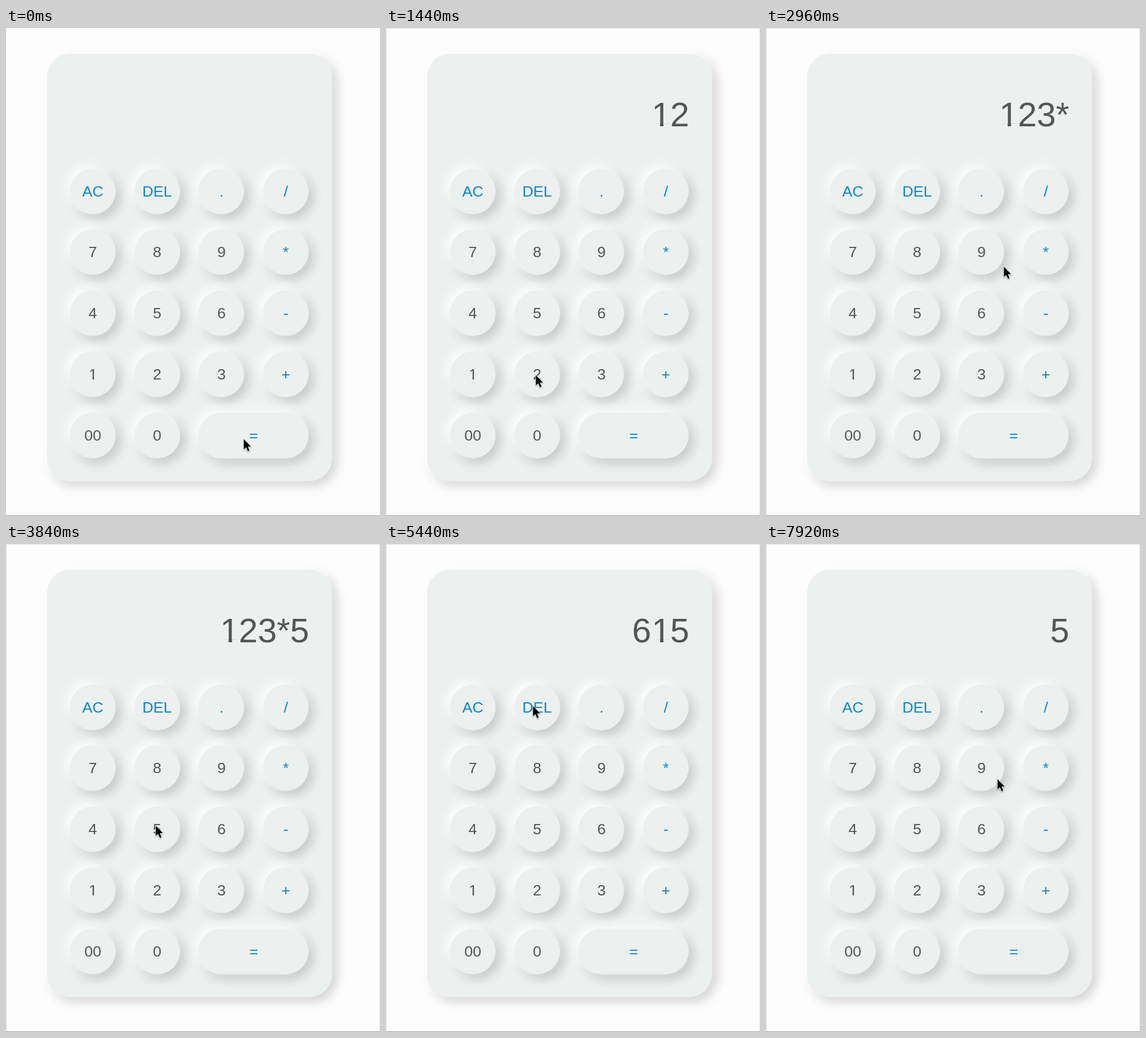
An HTML page for the animation above (8 s loop, 655x854 px).

```html
<!DOCTYPE html>
<html lang="en">
<head>
<meta charset="utf-8">
<title>Calculator</title>
<style>
  html, body { margin: 0; width: 100%; height: 100%; overflow: hidden; }
  body { background: #fdfdfd; font: 26.67px/1 "Liberation Sans", Arial, sans-serif; color: #555; }
  #stage { position: relative; width: 655px; height: 854px; overflow: hidden; }
  #stage > * { position: absolute; box-sizing: border-box; }
  .raised {
    background: #ecf0ef;
    box-shadow: -6.7px -6.7px 20px #fff, 6.7px 6.7px 20px rgba(0, 0, 0, .2);
  }
  #card { left: 72px; top: 45px; width: 499px; height: 748px; border-radius: 40px; }
  #display { right: 124px; top: 122px; font-size: 60px; white-space: nowrap; }
  .key { width: 80px; height: 80px; border-radius: 40px; line-height: 80px; text-align: center; }
  .wide { width: 193px; }
  .op { color: #0b87cb; }
  /* Trims the foot of the numeral one, leaving only its stem. */
  .one {
    display: inline-block;
    line-height: 1;
    position: relative;
    left: .015em;
    clip-path: polygon(0 0, 1em 0, 1em .755em, .345em .755em, .345em 1em, .246em 1em, .246em .755em, 0 .755em);
  }
  #frame { inset: 0; border: 1px solid #e2e3e3; border-bottom: 0; }
  #rule { left: 0; bottom: 0; width: 100%; height: 1px; background: #999; }
  #cursor { left: 0; top: 0; width: 20px; height: 28px; overflow: visible; filter: drop-shadow(0 1px 1px rgba(0, 0, 0, .35)); }
</style>
</head>
<body>
<div id="stage">
  <div id="card" class="raised"></div>
  <div id="display"></div>
  <div id="frame"></div>
  <div id="rule"></div>
  <svg id="cursor"><path d="M.5 .5V18.5L4.6 14.7 7.6 21.8 10.5 20.6 7.5 13.5H13Z" stroke="#fff" stroke-width="1.4" paint-order="stroke"/></svg>
</div>
<script>
const LOOP = 8000, STEP = 80;
const stage = document.getElementById('stage');
const display = document.getElementById('display');
const frame = document.getElementById('frame');
const cursor = document.getElementById('cursor');

const markup = text => text.replace(/1/g, '<span class="one">1</span>');

const rows = ['AC DEL . /', '7 8 9 *', '4 5 6 -', '1 2 3 +', '00 0 ='];
rows.forEach((row, r) => row.split(' ').forEach((label, c) => {
  const key = document.createElement('div');
  key.className = 'key raised';
  key.classList.toggle('op', !/\d/.test(label));
  key.classList.toggle('wide', label === '=');
  key.style.left = 112 + c * 112.7 + 'px';
  key.style.top = 245.5 + r * 106.75 + 'px';
  key.innerHTML = markup(label);
  stage.insertBefore(key, display);
}));

const readout = [
  [0, ''], [800, '1'], [1440, '12'], [2080, '123'], [2640, '123*'], [3600, '123*5'],
  [4480, '615'], [5600, '61'], [6080, '6'], [6720, ''], [7680, '5']
];

// Moves: start, end, target x, target y, easing
const smooth = k => k * k * (3 - 2 * k);
const glide = k => k * (1.2 - .2 * k);
const easeIn = k => k ** 1.5;
const home = [416, 719];
const moves = [
  [0, 640, 160, 613, smooth],
  [960, 1280, 262, 607, smooth],
  [1600, 1840, 367, 600, smooth],
  [2240, 2480, 482, 392, smooth],
  [2800, 3440, 253, 480, glide],
  [3760, 4320, 412, 706, smooth],
  [4640, 4880, 268, 300, easeIn],
  [5040, 5280, 261, 288, smooth],
  [5360, 5440, 257, 283, smooth],
  [6960, 7520, 253, 476, smooth],
  [7760, 7920, 405, 411, glide]
];

function pointer(t) {
  let [x, y] = home;
  for (const [start, end, tx, ty, ease] of moves) {
    if (t <= start) break;
    const k = ease(Math.min(1, (t - start) / (end - start)));
    x += (tx - x) * k;
    y += (ty - y) * k;
  }
  return [x, y];
}

let shown = '';
function draw(now) {
  const t = Math.floor(now % LOOP / STEP) * STEP;
  const text = readout.filter(([at]) => at <= t).pop()[1];
  if (text !== shown) {
    display.innerHTML = markup(text);
    shown = text;
  }
  const [x, y] = pointer(t);
  cursor.style.transform = `translate(${x}px, ${y}px)`;
  frame.style.visibility = t < 800 ? 'hidden' : 'visible';
}

const began = performance.now();
function tick() {
  draw(performance.now() - began);
  requestAnimationFrame(tick);
}
tick();
</script>
</body>
</html>
```
